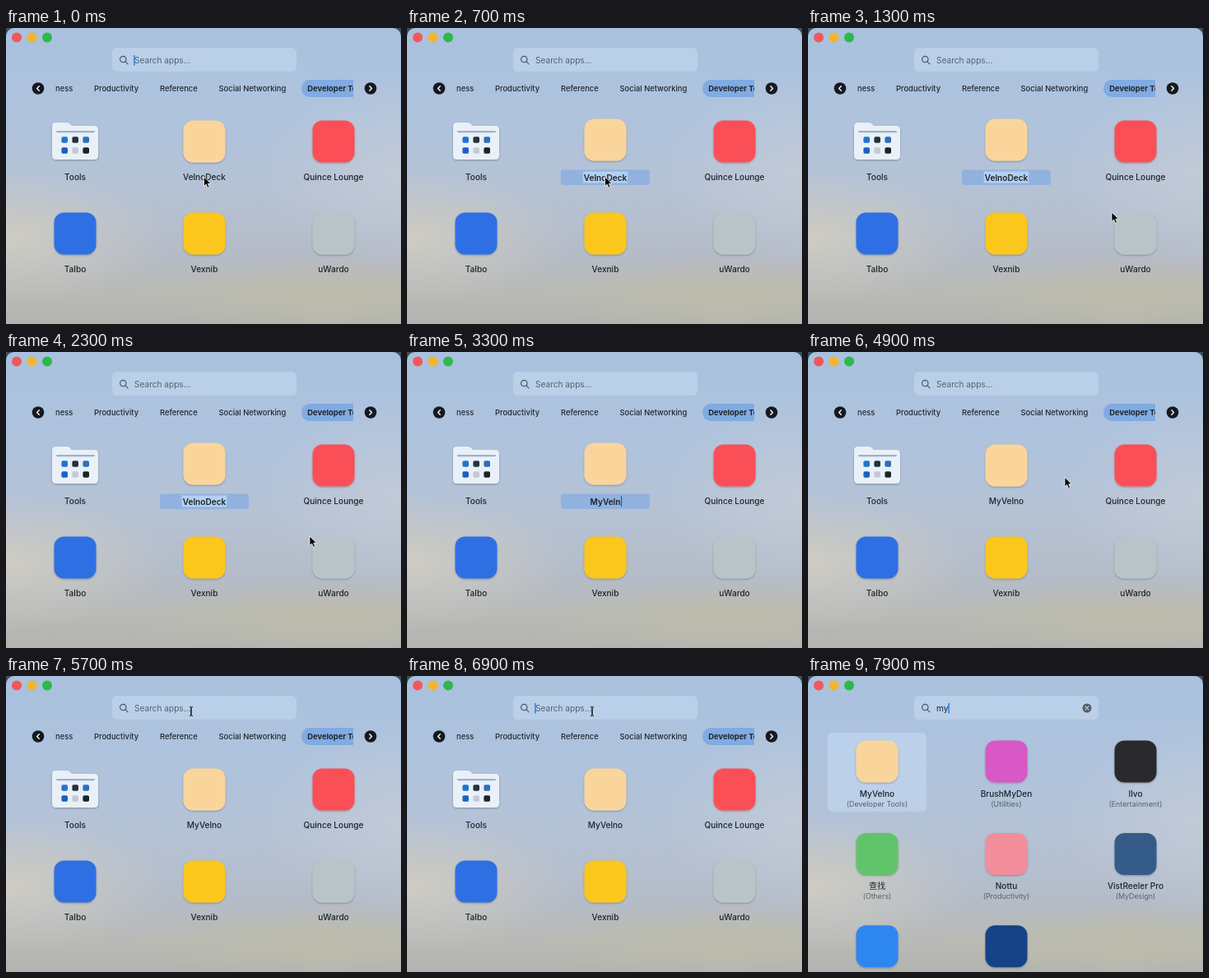
Write an HTML page that moves like this. It is 480 by 360 pixels and loops after 8 s.

```html
<!DOCTYPE html>
<html lang="en">
<head>
<meta charset="utf-8">
<title>App launcher</title>
<style>
  html, body { margin: 0; width: 100%; height: 100%; overflow: hidden; background: #3a505c; }
  svg { display: block; width: 100vw; height: 100vh; font-family: Inter, "Noto Sans CJK SC", "Noto Sans CJK", sans-serif; }
  .label { font-size: 10.1px; font-weight: 500; fill: #1d222a; text-anchor: middle; }
  .kind { font-size: 8.9px; fill: #59616d; text-anchor: middle; }
  .tab { font-size: 9.4px; font-weight: 500; fill: #20262e; }
  .query { font-size: 10.1px; }
</style>
</head>
<body>
<svg viewBox="0 0 480 360" preserveAspectRatio="none">
  <defs>
    <linearGradient id="sky" x1="0" y1="0" x2="0" y2="1">
      <stop offset="0" stop-color="#a9c1de"/>
      <stop offset=".3" stop-color="#afc3dd"/>
      <stop offset=".55" stop-color="#b5c2d4"/>
      <stop offset=".75" stop-color="#b4bcc8"/>
      <stop offset=".9" stop-color="#b9bab5"/>
      <stop offset="1" stop-color="#b2b4b0"/>
    </linearGradient>
    <radialGradient id="sand" gradientUnits="userSpaceOnUse" cx="0" cy="0" r="1" gradientTransform="translate(0 255) scale(200 80)">
      <stop offset="0" stop-color="#cfccc2"/>
      <stop offset="1" stop-color="#cfccc2" stop-opacity="0"/>
    </radialGradient>
    <radialGradient id="dusk" gradientUnits="userSpaceOnUse" cx="0" cy="0" r="1" gradientTransform="translate(390 325) scale(230 45)">
      <stop offset="0" stop-color="#bebcab"/>
      <stop offset="1" stop-color="#bebcab" stop-opacity="0"/>
    </radialGradient>
    <radialGradient id="glow" gradientUnits="userSpaceOnUse" cx="0" cy="0" r="1" gradientTransform="translate(480 175) scale(170 120)">
      <stop offset="0" stop-color="#c4ccd8" stop-opacity=".8"/>
      <stop offset="1" stop-color="#c4ccd8" stop-opacity="0"/>
    </radialGradient>
    <clipPath id="window"><rect width="480" height="380" rx="10"/></clipPath>
    <clipPath id="tabStrip"><rect x="60.2" y="60" width="361.8" height="28"/></clipPath>
    <filter id="shadow" x="-20%" y="-20%" width="140%" height="150%">
      <feDropShadow dx="0" dy="1" stdDeviation="1" flood-opacity=".28"/>
    </filter>
  </defs>

  <rect width="480" height="360" fill="#3a505c"/>
  <g clip-path="url(#window)">
    <rect width="480" height="360" fill="url(#sky)"/>
    <rect width="480" height="360" fill="url(#glow)"/>
    <rect width="480" height="360" fill="url(#sand)"/>
    <rect width="480" height="360" fill="url(#dusk)"/>
  </g>
  <circle cx="13" cy="11.5" r="6" fill="#f3575a"/>
  <circle cx="31.5" cy="11.5" r="6" fill="#f2b52c"/>
  <circle cx="50" cy="11.5" r="6" fill="#2fb84a"/>

  <rect x="129" y="24" width="224" height="29" rx="6" fill="#c4daf0" fill-opacity=".6"/>
  <g fill="none" stroke="#4a5563" stroke-width="1.2" stroke-linecap="round">
    <circle cx="142.3" cy="38" r="3.7"/><path d="M145 40.8l3 3"/>
  </g>
  <text id="query" class="query" x="156" y="42.6"></text>
  <rect id="caret" y="33" width="1.4" height="12.5" fill="#1f77e8"/>
  <g id="clear">
    <circle cx="339" cy="39" r="5.5" fill="#535d69"/>
    <path d="M337 37l4 4m0-4l-4 4" stroke="#d3dce7" stroke-width="1.1" stroke-linecap="round"/>
  </g>

  <g id="browse">
    <g clip-path="url(#tabStrip)">
      <rect x="359" y="63" width="90" height="21" rx="10" fill="#80abe3"/>
      <g id="tabs"></g>
    </g>
    <circle cx="39" cy="73.5" r="7.3" fill="#15191f"/>
    <circle cx="443" cy="73.5" r="7.3" fill="#15191f"/>
    <path d="M40.3 70.7l-2.7 2.8 2.7 2.8M441.8 70.7l2.7 2.8-2.7 2.8" fill="none" stroke="#fff" stroke-width="1.3" stroke-linecap="round" stroke-linejoin="round"/>
    <g id="folder">
      <path filter="url(#shadow)" d="M56 120q0-5 5-5h13q2 0 4 2l2 2h27q5 0 5 5v31q0 5-5 5H61q-5 0-5-5z" fill="#e9f0f8"/>
      <rect x="61" y="125" width="47" height="2.2" rx="1.1" fill="#9fb1c6"/>
    </g>
    <rect id="editBox" x="187" y="172.5" width="108" height="18.5" rx="3" fill="#91b2df"/>
    <rect id="selection" y="174.5" height="14" fill="#b3d0f1"/>
    <rect id="editCaret" y="175" width="1.2" height="13" fill="#1f5fb8"/>
  </g>

  <g id="results">
    <rect x="24" y="69" width="120" height="96" rx="6" fill="#c4d8f2" fill-opacity=".62"/>
  </g>

  <path id="arrow" d="M0 0v11.6l2.7-2.5 1.8 4.2 2.1-.9-1.8-4.1h3.6z" fill="#000" stroke="#fff" stroke-width=".8"/>
  <path id="beam" d="M-2-5.6q2 0 2 1.4v8.4q0 1.4-2 1.4M2-5.6q-2 0-2 1.4v8.4q0 1.4 2 1.4" fill="none" stroke="#111" stroke-width="1"/>
</svg>

<script>
const LOOP = 8000;
const COLUMNS = [84, 241, 398];
const OLD_NAME = "VelnoDeck";
const NEW_NAME = "MyVelno";
const EDIT = { start: 700, type: 2700, key: 120, end: 3750 };
const SEARCH = { focus: 6300, first: 7300, second: 7500 };

const $ = id => document.getElementById(id);

function add(parent, tag, attrs, text = "") {
  const node = document.createElementNS("http://www.w3.org/2000/svg", tag);
  set(node, attrs);
  node.textContent = text;
  parent.appendChild(node);
  return node;
}

function set(node, attrs) {
  for (const [key, value] of Object.entries(attrs)) node.setAttribute(key, value);
}

const show = (node, on) => node.setAttribute("visibility", on ? "visible" : "hidden");

function addIcon(parent, x, y, fill) {
  return add(parent, "rect", { x: x - 25.5, y: y - 25.5, width: 51, height: 51, rx: 12, fill, filter: "url(#shadow)" });
}

function addApp(parent, x, y, name, fill, kind) {
  const icon = fill && addIcon(parent, x, y, fill);
  const label = add(parent, "text", { class: "label", x, y: y + 46.6 - (kind ? 3.8 : 0) }, name);
  if (kind) add(parent, "text", { class: "kind", x, y: y + 54.6 }, `(${kind})`);
  return { icon, label };
}

const browse = $("browse"), results = $("results");

[["Productivity", 107], ["Reference", 187], ["Social Networking", 258.5]]
  .forEach(([name, x]) => add($("tabs"), "text", { class: "tab", x, y: 77 }, name));
add($("tabs"), "text", { class: "tab", x: 81.3, y: 77, "text-anchor": "end" }, "Business");
add($("tabs"), "text", { class: "tab", x: 366.3, y: 77, style: "font-weight:650" }, "Developer Tools");

["#1f74d4", "#27313b", "#2b6fbd", "#1d5fc4", "#c3cad6", "#1c2329"].forEach((fill, i) =>
  add($("folder"), "rect", { x: 67.4 + i % 3 * 13, y: 132.2 + Math.floor(i / 3) * 13, width: 7.6, height: 7.6, rx: 1.8, fill }));

const apps = [
  ["Tools"], [OLD_NAME, "#fad59b"], ["Quince Lounge", "#fb5058"],
  ["Talbo", "#2f70e4"], ["Vexnib", "#fcc71c"], ["uWardo", "#b9c4c9"]
].map(([name, fill], i) => addApp(browse, COLUMNS[i % 3], i < 3 ? 138 : 250, name, fill));
const renamed = apps[1];

[
  [NEW_NAME, "#fad59b", "Developer Tools"],
  ["BrushMyDen", "#d759c6", "Utilities"],
  ["Ilvo", "#2b2c2f", "Entertainment"],
  ["查找", "#62c46b", "Others"],
  ["Nottu", "#f28d9c", "Productivity"],
  ["VistReeler Pro", "#355c89", "MyDesign"],
  ["", "#2d86f1"], ["", "#174387"]
].forEach(([name, fill, kind], i) =>
  addApp(results, COLUMNS[i % 3], 104 + Math.floor(i / 3) * 112.4, name, fill, kind));

const ease = (t, from, to) => {
  const p = Math.min(1, Math.max(0, (t - from) / (to - from)));
  return p * p * (3 - 2 * p);
};
const mix = (a, b, p) => a + (b - a) * p;

function drawRename(t) {
  const editing = t >= EDIT.start && t < EDIT.end;
  const typing = t >= EDIT.type;
  const typed = NEW_NAME.slice(0, Math.floor((t - EDIT.type) / EDIT.key) + 1);
  renamed.label.textContent = typing ? typed : OLD_NAME;
  set(renamed.label, { y: editing ? 185.8 : 184.6, style: editing ? "font-weight:600" : "" });
  renamed.icon.setAttribute("y", editing ? 110.5 : 112.5);

  const width = editing ? renamed.label.getComputedTextLength() : 0;
  set($("selection"), { x: 241 - width / 2 - 1, width: width + 2 });
  $("editCaret").setAttribute("x", 241 + width / 2 + 0.5);
  show($("editBox"), editing);
  show($("selection"), editing && !typing);
  show($("editCaret"), editing && typing);
}

function drawSearch(t) {
  const text = t < SEARCH.first ? "" : t < SEARCH.second ? "m" : "my";
  const query = $("query");
  query.textContent = text || "Search apps...";
  query.setAttribute("fill", text ? "#1d222a" : "#566170");
  const focused = t < EDIT.start || t >= SEARCH.focus;
  const blinkOn = text || t < EDIT.start || (t - SEARCH.focus) % 1000 < 700;
  $("caret").setAttribute("x", text ? 156 + query.getComputedTextLength() : 155.2);
  show($("caret"), focused && blinkOn);
  show($("clear"), text);
  browse.style.display = text ? "none" : "";
  results.style.display = text ? "" : "none";
}

function drawPointer(t) {
  const away = ease(t, 700, 1150), up = ease(t, 4600, 5300);
  const x = mix(mix(240.5, 369, away), 225, up);
  const y = mix(mix(181, 224, away), 43, up);
  const visible = t < EDIT.type || (t >= 4600 && t < SEARCH.first);
  const inField = t > 4600 && y < 53;
  for (const id of ["arrow", "beam"]) {
    $(id).setAttribute("transform", `translate(${x} ${y})`);
    show($(id), visible && (id === "beam") === inField);
  }
}

function draw(t) {
  drawSearch(t);
  drawRename(t);
  drawPointer(t);
}

const start = performance.now();
function tick() {
  draw((performance.now() - start) % LOOP);
  requestAnimationFrame(tick);
}
tick();
</script>
</body>
</html>
```
